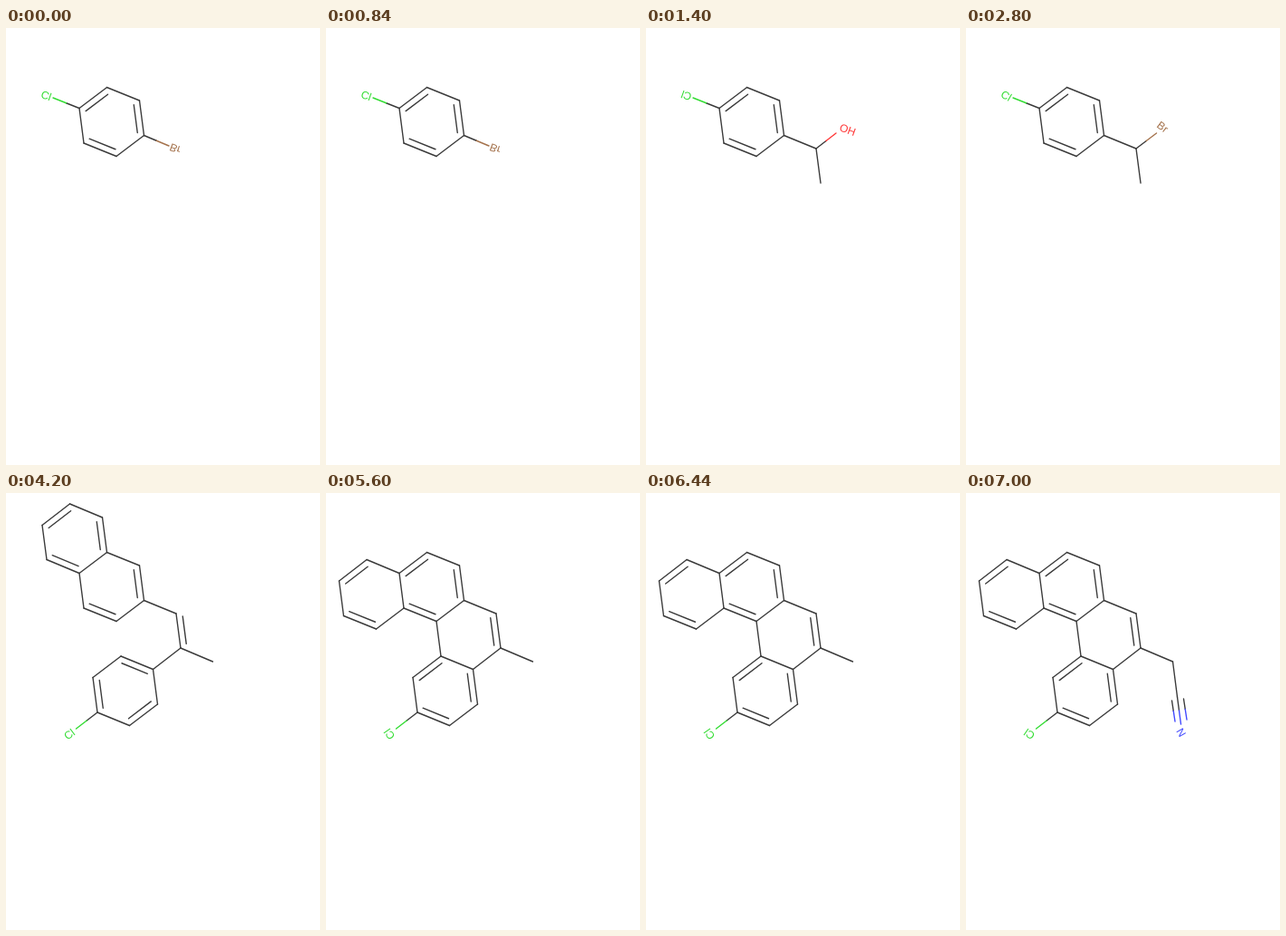
Write an HTML page that moves like this. It is 347x482 px and loops after 8 s.

```html
<!DOCTYPE html>
<html lang="en">
<head>
<meta charset="utf-8">
<title>Synthesis steps</title>
<style>
html, body { margin: 0; width: 100%; height: 100%; overflow: hidden; background: #fff; }
svg { display: block; }
line { stroke-width: 1.4; stroke-linecap: round; }
text { font: 12px "Liberation Sans", Arial, sans-serif; text-anchor: middle; }
</style>
</head>
<body>
<svg id="stage" width="347" height="482" viewBox="0 0 347 482"></svg>
<script>
const atoms = {
  a: [81, 88.5], b: [111.5, 65.5], c: [147.5, 80], d: [152.5, 118.5], e: [122, 141.5], f: [86, 127],
  g: [106.5, 27], h: [70.5, 12], i: [40, 35.5], j: [45, 73.5],
  u: [14.5, 97], v: [19.5, 135.5], w: [55.5, 150],
  k: [188, 133], l: [193, 171], m: [228.5, 186], t: [233.5, 225],
  n: [162.5, 194.5], o: [127, 180], p: [96, 203.5], q: [101, 242], r: [136.5, 256.5], s: [167.5, 233]
};
const BLACK = '#3a3a3a', GREEN = '#32dc32', BROWN = '#a4724c', RED = '#ff3838', BLUE = '#4048ff';

const mix = (p, q, t) => [p[0] + (q[0] - p[0]) * t, p[1] + (q[1] - p[1]) * t];
const line = (p, q, color = BLACK) =>
  `<line x1="${p[0]}" y1="${p[1]}" x2="${q[0]}" y2="${q[1]}" stroke="${color}"/>`;
const halves = (p, q, color) => line(p, mix(p, q, .5)) + line(mix(p, q, .5), q, color);

// "a=b" puts the second stroke on the right-hand side of a -> b.
function bond(code) {
  const p = atoms[code[0]], q = atoms[code.at(-1)];
  if (code.length < 3) return line(p, q);
  const dx = q[0] - p[0], dy = q[1] - p[1], k = 6.8 / Math.hypot(dx, dy);
  const shift = ([x, y]) => [x - dy * k, y + dx * k];
  return line(p, q) + line(shift(mix(p, q, .1)), shift(mix(p, q, .9)));
}
const bonds = list => list.split(' ').map(bond).join('');
const label = (text, x, y, angle, color, flip = 1) =>
  `<text y="4.3" fill="${color}" transform="translate(${x} ${y}) rotate(${angle}) scale(1 ${flip})">${text}</text>`;

const ring = 'a=b bc c=d de e=f fa ';
const topCl = angle => halves(atoms.a, [52, 77], GREEN) + label('Cl', 44.5, 74.5, angle, GREEN);
const lowCl = angle => halves(atoms.q, [77.5, 260], GREEN) + label('Cl', 70, 266, angle, GREEN);
const fused = ring + 'u=j ja fw w=v vu dk k=l ln lm eo on n=s sr r=q qp p=o';
const nitrile = bonds('mt') + halves(atoms.t, [237.5, 255], BLUE) +
  halves([227.5, 229], [231, 252], BLUE) + halves([240.5, 227], [244, 250], BLUE) +
  label('N', 238, 264, 60, BLUE);

const steps = [
  bonds(ring.trim()) + topCl(20) + halves(atoms.d, [180, 130], BROWN) + label('Br', 187, 133, 20, BROWN, -1),
  bonds(ring + 'dk kl') + topCl(200) + halves(atoms.k, [210, 116], RED) + label('OH', 223, 112, 20, RED),
  bonds(ring + 'dk kl') + topCl(30) + halves(atoms.k, [210.5, 116], BROWN) + label('Br', 217.5, 109, 37, BROWN),
  bonds('ab bc c=d de e=f fa i=h hg g=b a=j ji dk l=k lm ln o=n ns s=r rq q=p po') + lowCl(-37),
  bonds(fused) + lowCl(235),
  bonds(fused) + lowCl(215) + nitrile
];

const stage = document.getElementById('stage');
let shown = -1;
function draw() {
  const step = Math.floor(performance.now() % 8000 / 1400);
  if (step !== shown) stage.innerHTML = steps[shown = step];
  requestAnimationFrame(draw);
}
draw();
</script>
</body>
</html>
```
